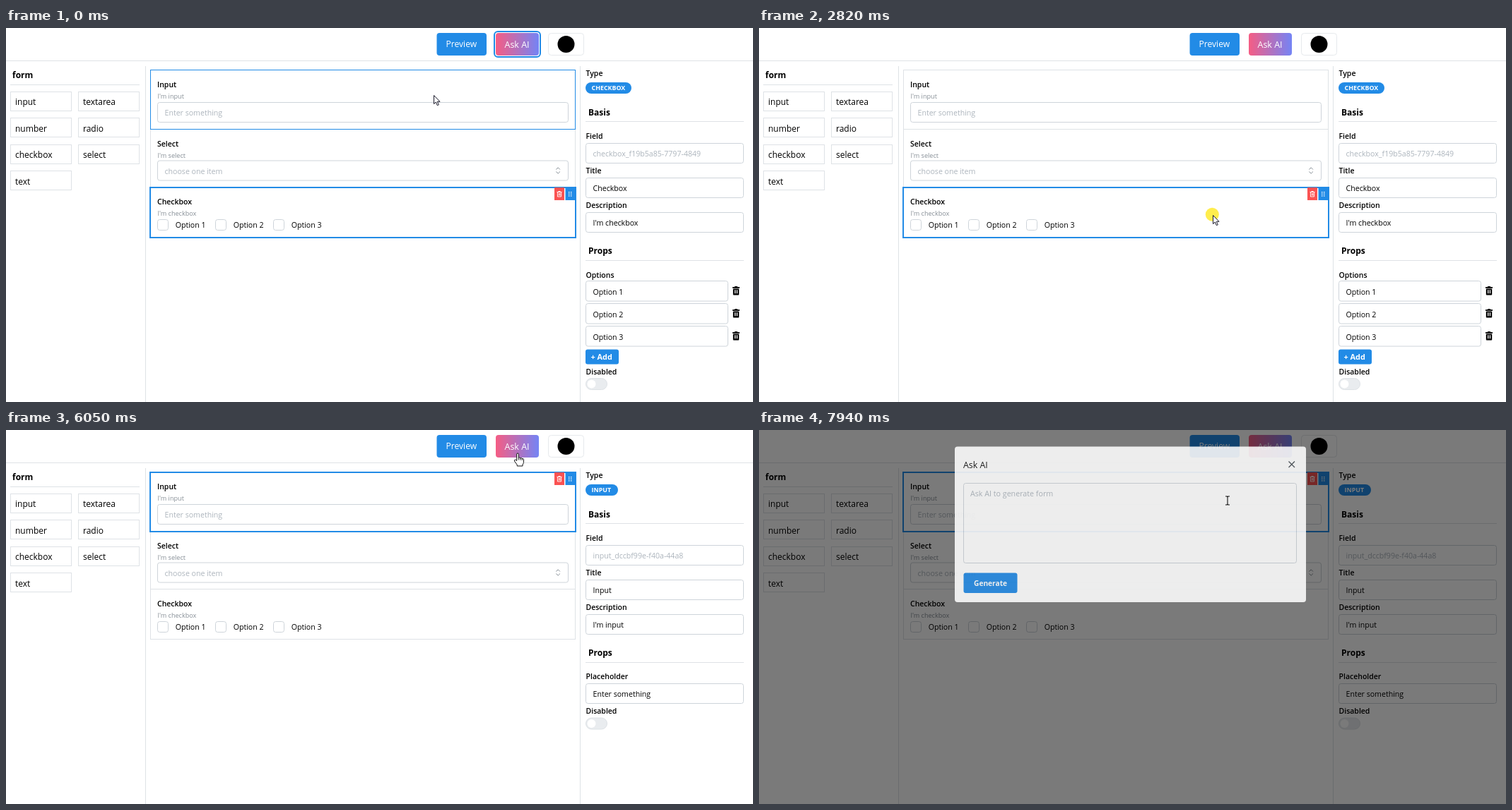
Recreate the animation shown at these times as an HTML page. Size 1057 by 530 pixels, loop 8000 ms.

```html
<!DOCTYPE html>
<html lang="en">
<head>
<meta charset="utf-8">
<title>Form builder</title>
<style>
  html, body { margin: 0; width: 100%; height: 100%; overflow: hidden; background: #fff; }
  svg { display: block; font-family: "Open Sans", "Noto Sans", sans-serif; }
  text { white-space: pre; }
</style>
</head>
<body>
<svg id="stage" width="1057" height="530" viewBox="0 0 1057 530"></svg>
<script>
const BLUE = '#228be6', LINE = '#dee2e6', EDGE = '#ced4da', MUTED = '#868e96', HINT = '#adb5bd';
const LOOP = 8000;
const stage = document.getElementById('stage');

// Rows of the form, top to bottom
const ROWS = {
  input: { title: 'Input', top: 59.5, bottom: 143.5, badge: 46, id: 'input_dccbf99e-f40a-44a8', hint: 'Enter something' },
  select: { title: 'Select', top: 143.5, bottom: 225.5, badge: 52, id: 'select_7b02c6d1-93ae-4f17', hint: 'choose one item', options: true },
  checkbox: { title: 'Checkbox', top: 225.5, bottom: 296.5, badge: 65, id: 'checkbox_f19b5a85-7797-4849', options: true }
};
const SELECTED = [[0, 'checkbox'], [850, 'input'], [2470, 'select'], [2820, 'checkbox'], [3580, 'select'], [3930, 'input']];
const CLICKS = [780, 2400, 2750, 3510, 3860, 7660];
const TICK_STARTS = [0, 320, 780, 1720, 2120, 3510, 6180, 6890];

// Pointer path: time, x, y
const PATH = [
  [0, 605, 95], [319, 605, 95], [320, 604, 95], [920, 604, 95], [1120, 720, 170], [1720, 720, 170],
  [1860, 888, 205], [2050, 888, 205], [2120, 870, 190], [2400, 640, 195], [2540, 640, 195],
  [2750, 642, 265], [2960, 642, 265], [3380, 643, 194], [3510, 643, 191], [3650, 643, 191],
  [3860, 597, 92], [4070, 597, 92], [4280, 535, 138], [4630, 500, 200], [4900, 560, 286],
  [5260, 724, 33], [6180, 724, 33], [6460, 662, 66], [6700, 716, 26], [6810, 722, 36],
  [7240, 650, 180], [7660, 728, 33], [7800, 728, 33], [7870, 702, 62], [7940, 663, 100], [8000, 663, 100]
];

const lastBefore = (list, t) => list.filter(item => item[0] <= t).pop();

function snap(t) {
  const start = TICK_STARTS.filter(s => s <= t).pop();
  return start + Math.floor((t - start) / 70) * 70;
}

function pointerAt(t) {
  const i = PATH.findIndex(p => p[0] > t);
  const [t0, x0, y0] = PATH[i - 1], [t1, x1, y1] = PATH[i];
  const k = (t - t0) / (t1 - t0);
  return { x: Math.round(x0 + (x1 - x0) * k), y: Math.round(y0 + (y1 - y0) * k) };
}

// Drawing helpers; text is placed by the middle of its capitals
const text = (x, cy, str, size = 10.6, fill = '#000', weight = 400) =>
  `<text x="${x}" y="${cy + size * 0.36}" font-size="${size}" fill="${fill}" font-weight="${weight}">${str}</text>`;
const label = (x, cy, str) => text(x, cy, str, 10.5, '#000', 600);
const heading = (x, cy, str) => text(x, cy, str, 12, '#000', 700);
const rect = (x, y, w, h, fill, r = 0) =>
  `<rect x="${x}" y="${y}" width="${w}" height="${h}" rx="${r}" fill="${fill}"/>`;
const box = (x, y, w, h, stroke = EDGE, r = 3, fill = 'none', width = 1) =>
  `<rect x="${x}" y="${y}" width="${w}" height="${h}" rx="${r}" fill="${fill}" stroke="${stroke}" stroke-width="${width}"/>`;
const path = (d, stroke, width = 1, fill = 'none') =>
  `<path d="${d}" fill="${fill}" stroke="${stroke}" stroke-width="${width}" stroke-linejoin="round"/>`;
const circle = (x, y, r, fill, opacity = 1) =>
  `<circle cx="${x}" cy="${y}" r="${r}" fill="${fill}" opacity="${opacity}"/>`;
const at = (x, y, content, opacity = 1) =>
  `<g transform="translate(${x} ${y})" opacity="${opacity}">${content}</g>`;

function header(focused) {
  return path('M0 46.5H1057', LINE)
    + rect(609.5, 7, 70.5, 32, BLUE, 4) + text(622.5, 23, 'Preview', 12.1, '#fff')
    + (focused ? box(691, 5, 65, 36, BLUE, 5, 'none', 2) : '')
    + rect(693, 7, 61, 32, 'url(#askFill)', 4) + text(705.5, 23, 'Ask AI', 12.5, '#fff')
    + box(767.5, 7.5, 50, 31, '#e6e9ec', 4) + circle(792.5, 23, 12, '#000');
}

function palette() {
  const names = ['input', 'textarea', 'number', 'radio', 'checkbox', 'select', 'text'];
  return heading(9, 67, 'form') + path('M6 80.5H189M197.5 54V530', LINE)
    + names.map((name, i) => {
      const x = i % 2 ? 102.5 : 6.5, y = 91 + Math.floor(i / 2) * 37.4;
      return box(x, Math.round(y) - 0.5, i % 2 ? 86 : 86, 27, LINE, 0) + text(x + 6.5, y + 14, name, 12);
    }).join('');
}

const optionBoxes = () => [1, 2, 3].map((n, i) => {
  const x = 214.5 + i * 82;
  return box(x, 271.5, 15, 15) + text(x + 25.2, 279.5, 'Option ' + n);
}).join('');

function rowTools(y) {
  const dots = [0, 1, 2].map(i => rect(796, y + 6 + i * 2.6, 1.4, 1.4, '#fff') + rect(799, y + 6 + i * 2.6, 1.4, 1.4, '#fff')).join('');
  return rect(776, y, 14, 18, '#fa5252') + rect(791.5, y, 14.5, 18, BLUE) + dots
    + path(`M779.5 ${y + 6.5}h7M781.5 ${y + 5.5}h3M780.5 ${y + 7}v6h5v-6M782.5 ${y + 8}v3.5M784 ${y + 8}v3.5`, '#fff', 0.9);
}

function canvas(selected, hovered, focusSelect) {
  const frame = (row, color, width = 1) => box(204.5, row.top, 601, row.bottom - row.top, color, 0, 'none', width);
  const rows = Object.values(ROWS).map(row => frame(row, LINE)
    + label(214, row.top + 21, row.title)
    + text(214.5, row.top + 37, "I'm " + row.title.toLowerCase(), 9.1, MUTED)).join('');
  const active = ROWS[selected];
  return rows
    + box(214.5, 105.5, 581, 28) + text(224.5, 120.5, 'Enter something', 10.6, HINT)
    + box(214.5, 188, 581, 28, focusSelect ? BLUE : EDGE) + text(224.5, 203, 'choose one item', 10.6, HINT)
    + path('M778.5 200.5l2.7-2.7 2.7 2.7M778.5 203.5l2.7 2.7 2.7-2.7', MUTED)
    + optionBoxes()
    + (hovered ? frame(ROWS[hovered], BLUE) : '')
    + box(204, active.top + 0.5, 602, active.bottom - active.top, BLUE, 0, 'none', 2)
    + rowTools(active.top + 0.5);
}

const trash = (x, y) => at(x, y, rect(0, 1, 10, 1.8, '#000') + rect(3, 0, 4, 1.5, '#000') + rect(0.8, 3.4, 8.4, 9, '#000', 1)
  + rect(3, 5.2, 1.3, 5, '#fff') + rect(5.8, 5.2, 1.3, 5, '#fff'));

const field = (y, name, value, color = '#000', width = 223) =>
  label(820.5, y, name) + box(820.5, y + 10, width, 28) + text(830.5, y + 24.3, value, 10.6, color);

function panel(selected) {
  const row = ROWS[selected];
  let out = path('M812.5 54V530', LINE) + label(820.5, 64.5, 'Type')
    + rect(820, 77, row.badge, 16, BLUE, 8) + text(828.5, 85.2, row.title.toUpperCase(), 8.9, '#fff', 700)
    + heading(824, 120, 'Basis') + path('M820 132.5H1044M820 329.5H1044', LINE)
    + field(153.5, 'Field', row.id, HINT) + field(202.5, 'Title', row.title)
    + field(251.5, 'Description', "I'm " + row.title.toLowerCase())
    + heading(824, 316, 'Props');
  let y = 350;
  if (row.hint) {
    out += field(y - 0.5, 'Placeholder', row.hint);
    y += 48.5;
  }
  if (row.options) {
    out += label(820.5, y, 'Options');
    for (let n = 1; n <= 3; n++) {
      const top = Math.round(y) + 8.5 + (n - 1) * 32;
      out += box(820.5, top, 201, 28.5) + text(830.5, top + 15.2, 'Option ' + n) + trash(1028, top + 7.5);
    }
    out += rect(820, y + 105.5, 47, 21, BLUE, 3) + text(827.5, y + 116, '+ Add', 10.9, '#fff', 700);
    y += 137;
  }
  out += label(820.5, y, 'Disabled') + box(820.5, y + 9.5, 30, 16, LINE, 8, '#e9ecef') + circle(828.5, y + 17.5, 6, '#fff');
  if (row.hint && row.options) out += rect(1047, 54, 5, 430, '#d5d8dc', 2.5);
  return out;
}

function dialog(opacity, shift) {
  return `<rect width="1057" height="530" opacity="${0.6 * opacity}"/>`
    + at(0, shift, rect(277, 23.5, 497, 220.5, '#fff', 4)
      + text(289, 49.5, 'Ask AI', 12.4, '#111')
      + path('M749.5 44.5l8.5 8.5M758 44.5l-8.5 8.5', '#495057', 1.3)
      + box(289.5, 75.5, 471, 113, EDGE, 3, '#fff') + text(299, 90, 'Ask AI to generate form', 10.7, HINT)
      + rect(289.5, 202.5, 76, 28.5, BLUE, 3) + text(304, 217.2, 'Generate', 10.2, '#fff', 700), opacity);
}

const POINTERS = {
  arrow: path('M.5 .5V12.6L3.3 10L5.3 14.7L7.3 13.8L5.3 9.3H9Z', '#1a1a2a', 1, '#fff'),
  beam: path('M-3 -6h2.2l.8 .8 .8 -.8h2.2M0 -5.2v10.4M-3 6h2.2l.8 -.8 .8 .8h2.2', '#111', 1.1),
  hand: path('M-1.3 10.5V1.2Q-1.3 0 0 0T1.3 1.2V6.4Q2.6 5.6 3.8 6.8Q5 6.2 6.2 7.4Q8.4 7 8.5 9.2V12.5Q8.3 14.5 7 16V18H-.8V16.2L-4.6 11Q-5 9.3 -3.4 9Z', '#111', 1, '#fff')
    + path('M1.3 6.4V9.5M3.8 7V9.7M6.2 7.4V10', '#111', 0.9)
};

function pointerShape(x, y, t) {
  const inside = (x0, y0, x1, y1) => x >= x0 && x <= x1 && y >= y0 && y <= y1;
  if (t >= 7940) return 'beam';
  if (t >= 7660) return 'arrow';
  if (inside(693, 7, 754, 39) || inside(214, 188, 796, 216)) return 'hand';
  if (inside(214, 105, 796, 134) || inside(820, 163, 1044, 191) || inside(820, 212, 1044, 240)) return 'beam';
  return 'arrow';
}

function draw(t) {
  const { x, y } = pointerAt(t);
  const selected = lastBefore(SELECTED, t)[1];
  const hovered = x > 204 && x < 806 && Object.keys(ROWS).find(k => y >= ROWS[k].top && y < ROWS[k].bottom);
  const focusSelect = (t >= 2400 && t < 2750) || (t >= 3510 && t < 3860);
  const clicked = CLICKS.some(c => t >= c && t < c + 140);
  stage.innerHTML = '<defs><linearGradient id="askFill"><stop stop-color="#f55d84"/><stop offset="1" stop-color="#7484f5"/></linearGradient></defs>'
    + header(t < 850) + palette() + canvas(selected, hovered, focusSelect) + panel(selected)
    + (t >= 7940 ? dialog(0.87, 0) : t >= 7870 ? dialog(0.35, -8) : '')
    + (clicked ? circle(x - 0.7, y - 0.7, 9.5, '#ffea2e', 0.85) : '')
    + at(x, y, POINTERS[pointerShape(x, y, t)]);
}

const begin = performance.now();
let shown = -1;
function tick() {
  const t = snap((performance.now() - begin) % LOOP);
  if (t !== shown) draw(shown = t);
  requestAnimationFrame(tick);
}
tick();
</script>
</body>
</html>
```
